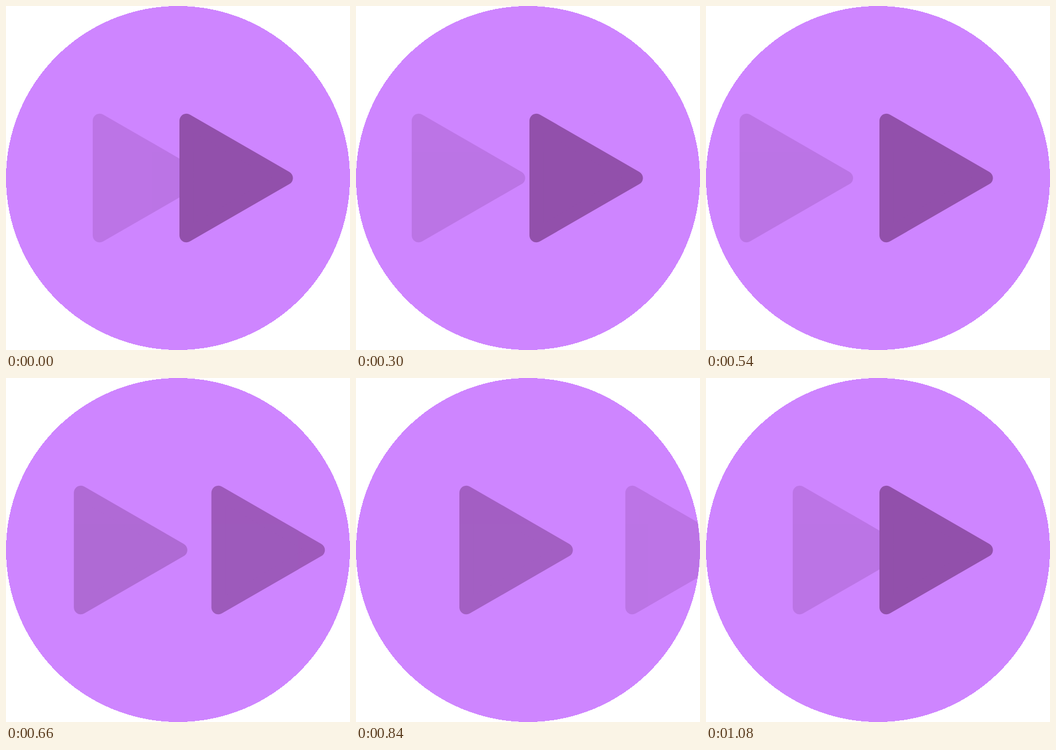
Animation, 599 px wide and 600 px high, one loop 3000 ms. Source, as an HTML page:

```html
<!DOCTYPE html>
<html lang="en">
<head>
<meta charset="utf-8">
<title>Fast forward</title>
<style>
  html, body { margin: 0; width: 100%; height: 100%; overflow: hidden; background: #fff; }
  svg { display: block; width: 100%; height: 100%; }
  .arrow { fill: #9250ab; stroke: #9250ab; stroke-width: 24.4; stroke-linejoin: round; }
</style>
</head>
<body>
<svg viewBox="0 0 599 600">
  <clipPath id="disc"><ellipse cx="299.5" cy="300" rx="299.5" ry="300"/></clipPath>
  <ellipse cx="299.5" cy="300" rx="299.5" ry="300" fill="#ce85ff" shape-rendering="crispEdges"/>
  <g clip-path="url(#disc)">
    <path class="arrow" id="rear" d="M12.2 200V400L185.4 300Z"/>
    <path class="arrow" id="front" d="M12.2 200V400L185.4 300Z"/>
  </g>
</svg>
<script>
  const LOOP = 3000, STEP = 60;
  const REAR_X = 151, FRONT_X = 302, FAINT = 0.3;

  function place(id, x, opacity) {
    const arrow = document.getElementById(id);
    arrow.setAttribute("transform", `translate(${x} 0)`);
    arrow.setAttribute("opacity", opacity);
  }

  function draw() {
    const step = Math.floor(performance.now() % LOOP / STEP);
    const ramp = (start, end) => Math.min(1, Math.max(0, (step - start) / (end - start)));

    if (step < 15) {
      // The rear arrow winds up, then chases the front one out of the disc.
      const windUp = 54 * ramp(0, 5) + 38.5 * ramp(5, 9);
      const launch = ramp(9, 12), chase = ramp(12, 14);
      place("rear", REAR_X - windUp + 89.5 * launch + 32 * chase,
            FAINT + 0.3 * launch + 0.11 * chase);
      place("front", FRONT_X + 83.5 * (launch + chase), 1 - 0.29 * launch - 0.41 * chase);
    } else {
      // The chaser becomes the front arrow and a new faint one follows it.
      const remaining = 1 - ramp(15, 18);
      place("rear", REAR_X - 35 * remaining, FAINT);
      place("front", FRONT_X - 38 * remaining, 1 - 0.08 * remaining);
    }
    requestAnimationFrame(draw);
  }
  draw();
</script>
</body>
</html>
```
